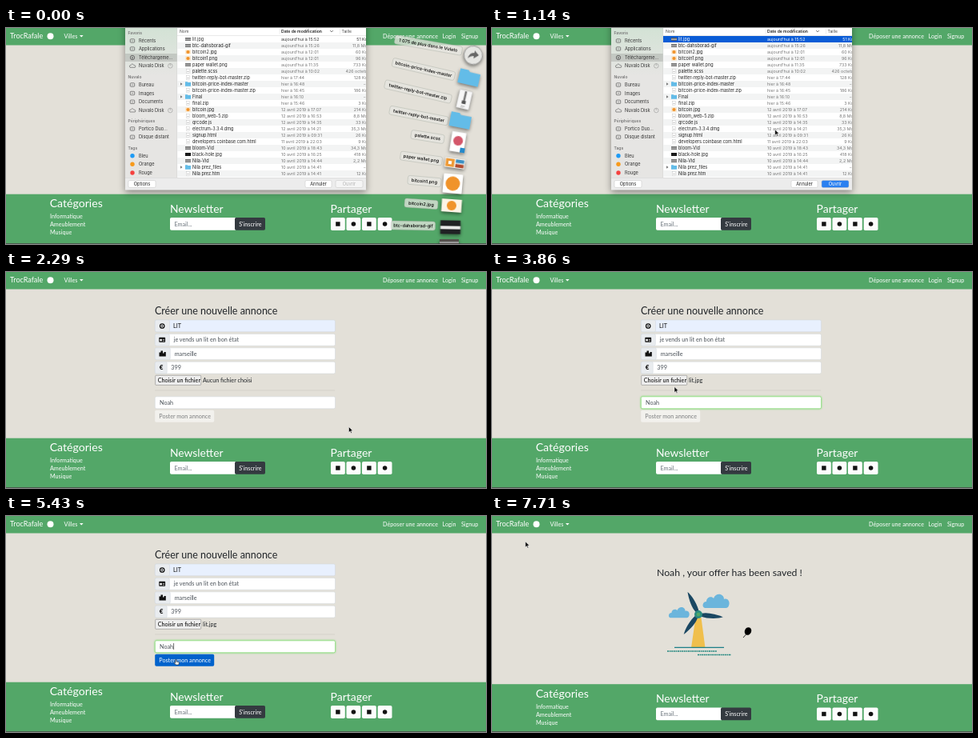
An HTML page that plays this animation: 600x270 px, repeating every 8 s.

```html
<!DOCTYPE html>
<html lang="fr">
<head>
<meta charset="utf-8">
<style>
html, body { margin: 0; width: 100%; height: 100%; overflow: hidden; background: #e3e0d8 }
svg { display: block; width: 600px; height: 270px; font-family: Lato, sans-serif }
text { white-space: pre }
.ui { font-family: Inter, sans-serif }
</style>
</head>
<body>
<svg id="stage" viewBox="0 0 600 270"></svg>
<script>
const GREEN = '#53a768', INK = '#212529';
const stage = document.getElementById('stage');

const text = (x, y, s, size = 7.2, fill = INK, more = '') =>
  `<text x="${x}" y="${y}" font-size="${size}" fill="${fill}" ${more}>${s}</text>`;
const rect = (x, y, w, h, fill, r = 0, more = '') =>
  `<rect x="${x}" y="${y}" width="${w}" height="${h}" rx="${r}" fill="${fill}" ${more}/>`;
const circle = (x, y, r, fill, more = '') =>
  `<circle cx="${x}" cy="${y}" r="${r}" fill="${fill}" ${more}/>`;
const path = (d, fill, more = '') => `<path d="${d}" fill="${fill}" ${more}/>`;
const group = (id, body, more = '') => `<g id="${id}" ${more}>${body}</g>`;
const line = (color, w = .5) => `stroke="${color}" stroke-width="${w}"`;

// Page parts
const nav = rect(0, 0, 600, 21.5, GREEN) +
  text(5, 13, 'TrocRafale', 9, '#fff') + circle(55.5, 10.3, 4, '#fff') +
  text(72.5, 12.7, 'Villes', 7.2, '#fff') + path('M92 9h4.6l-2.3 2.5z', '#fff') +
  text(471, 12.7, 'Déposer une annonce', 7.2, '#fff') +
  text(545.5, 12.7, 'Login', 7.2, '#fff') + text(569, 12.7, 'Signup', 7.2, '#fff');

const footer = rect(0, 207.7, 600, 70, GREEN) +
  text(54.7, 224, 'Catégories', 14.1, '#fff') +
  ['Informatique', 'Ameublement', 'Musique'].map((s, i) => text(55, 238.2 + i * 10, s, 7.2, '#fff')).join('') +
  text(205, 230.8, 'Newsletter', 13.8, '#fff') +
  rect(205, 237, 83, 15.8, '#fff', 1.8) + text(210.5, 247.5, 'Email...', 7.2, '#6c757d') +
  rect(286, 237, 38, 15.8, '#343a40', 1.8) + text(291.2, 247.5, "S'inscrire", 7.2, '#fff') +
  text(405.5, 230.8, 'Partager', 14, '#fff') +
  [406, 425.5, 445, 464.7].map((x, i) => rect(x, 237, 17.8, 16, '#fdfdfd', 1.8) +
    (i % 2 ? circle(x + 8.9, 245, 2.8, '#111') : rect(x + 6.2, 242.3, 5.4, 5.4, '#111'))).join('');

const fields = [
  ['LIT', 204.5, 209, '#e8f0fe'],
  ['je vends un lit en bon état', 204.3, 209.7, '#fff'],
  ['marseille', 205.3, 210.7, '#fff'],
  ['399', 201.2, 206.3, '#fff']
];
const icons = [
  circle(195.2, 67.5, 2.7, 'none', line('#111', 1.3)) + circle(195.2, 67.5, .9, '#111'),
  rect(191.3, 81.8, 7.8, 6, '#111', .8) + rect(192.3, 83.8, 2.6, 2.6, '#eee') +
    path('M195.8 84.4h2.3M195.8 86.2h2.3', 'none', line('#eee', .7)),
  path('M191.5 105.5v-5h2v-2h2.5v3h1.5v-1.5h2.3v5.5z', '#111'),
  text(191.8, 122.2, '€', 8, '#111', 'font-weight="900"')
];
const form = text(186, 53, 'Créer une nouvelle annonce', 12.5) +
  fields.map(([s, edge, x, fill], i) => {
    const y = 60 + i * 17.4;
    return rect(186.3, y, 225.2, 14.8, fill, 1.8, line('#ced4da')) +
      rect(186.3, y, edge - 186.3, 14.8, '#e9ecef', 1.8, line('#ced4da')) +
      icons[i] + text(x, y + 10, s, 7.2, i ? '#495057' : '#111');
  }).join('') +
  rect(186.7, 129.3, 57, 12, '#efefef', .8, line('#767676')) +
  text(189.7, 137.7, 'Choisir un fichier', 7.2, '#000') +
  text(246, 137.7, '', 7.2, INK, 'id="picked"') +
  rect(186, 147.7, 225, .6, '#cbc8c1') +
  rect(186.3, 155.8, 225.2, 15, '#fff', 1.8, 'id="field"') +
  text(192, 165.8, 'Noah', 7.2, '#495057', 'id="name"') + rect(0, 159, .6, 8, '#111', 0, 'id="caret"') +
  rect(186.2, 172.8, 74, 15, '#f2f1ed', 1.8, 'id="post"') +
  text(191.3, 182.8, 'Poster mon annonce', 7.2, '#7c7e7f', 'id="postText"');

const cloud = (x, y, k) => path('M2 18C-2 17-1 10 4 10 4 4 11 3 13 6 16-2 26 0 26 7 31 5 34 11 32 15 31 18 29 18 27 18Z',
  '#6bb5dc', `transform="translate(${x} ${y}) scale(${k})"`);
const blade = a => path('M-1.5 -3C-4.5 -10-3.5 -21-1 -31 2 -25 4 -12 2 -3Z', '#1a4762', `transform="translate(258 123) rotate(${a})"`);
const saved = text(206, 75, 'Noah , your offer has been saved !', 12.25) +
  cloud(264, 97, 1) + cloud(221.3, 113.3, .78) +
  path('M254.5 127h7l5 37.7h-17.5z', '#f0bf4c') +
  [-24, 98, 218].map(blade).join('') +
  circle(258, 123, 5, '#2b8c80') + circle(258, 123, 2.3, '#52a868') +
  path('M228 164.3h62', 'none', line('#1d7f88', 1.2)) +
  path('M219 169h62M257 173.5h42', 'none', line('#23877f', 1.4) + ' stroke-dasharray="2 .6"') +
  `<ellipse cx="320" cy="144" rx="4.1" ry="5" fill="#000" transform="rotate(25 320 144)"/>` +
  path('M318 147.5l-4 4.5', 'none', line('#000', .8));

// File dialog
const avril = (d, h) => `${d} avril 2019 à ${h}`;
const files = [
  ['lit.jpg', "aujourd'hui à 15:52", '51 Ko', 'bar'],
  ['btc-dahsborad-gif', "aujourd'hui à 15:26", '11,8 Mo', 'bar'],
  ['bitcoin2.jpg', "aujourd'hui à 12:01", '60 Ko', 'coin'],
  ['bitcoin1.png', "aujourd'hui à 12:01", '96 Ko', 'coin'],
  ['paper wallet.png', "aujourd'hui à 11:35", '733 Ko', 'bar'],
  ['palette.scss', "aujourd'hui à 10:02", '426 octets'],
  ['twitter-reply-bot-master.zip', 'hier à 17:44', '128 Ko'],
  ['bitcoin-price-index-master', 'hier à 16:48', '--', 'dir'],
  ['bitcoin-price-index-master.zip', 'hier à 16:45', '186 Ko'],
  ['Final', 'hier à 16:10', '--', 'dir'],
  ['final.zip', 'hier à 15:46', '3 Ko'],
  ['bitcoin.jpg', avril(12, '17:07'), '214 Ko', 'coin'],
  ['bloom_web-5.zip', avril(12, '16:53'), '8,8 Mo'],
  ['qrcode.js', avril(12, '14:35'), '33 Ko'],
  ['electrum-3.3.4.dmg', avril(12, '14:21'), '35,3 Mo'],
  ['signup.html', avril(12, '09:31'), '26 Ko'],
  ['developers.coinbase.com.html', avril(11, '22:03'), '9 Ko'],
  ['bloom-Vid', avril(10, '18:43'), '34,3 Mo', 'bar'],
  ['black-hole.jpg', avril(10, '16:25'), '418 Ko', 'dark'],
  ['Nila-Vid', avril(10, '14:44'), '2,2 Mo', 'bar'],
  ['Nila prez_files', avril(10, '14:41'), '--', 'dir'],
  ['Nila prez.htm', avril(10, '14:41'), '12 Ko']
];
const folder = (x, y, w, h) => path(`M${x} ${y}h${w * .4}l${w * .08} ${h * .13}h${w * .52}v${h * .87}h${-w}z`, '#63bce8');
const fileIcon = (kind, y) => ({
  bar: rect(224, y - 1.8, 7, 3.6, '#555') + rect(224, y - .5, 7, 1.2, '#ccc'),
  coin: rect(224.3, y - 2.7, 6.4, 5.4, '#fbe3c2') + circle(227.5, y, 2.1, '#f0932b'),
  dark: rect(224, y - 2, 7, 4, '#1a1a1a'),
  dir: folder(224, y - 2.7, 7, 5.4) + path(`M218 ${y - 1.7}v3.4l2.6-1.7z`, '#777')
})[kind] || rect(225.4, y - 2.7, 4.3, 5.4, '#fff', 0, line('#bbb', .4)) + rect(226.5, y, 2, 1, '#bbb');

const fileRow = ([name, date, size, kind], i) => {
  const y = 14 + i * 8, tone = i ? '#777' : 'inherit';
  return (i % 2 ? rect(214, y - 4, 236, 8, '#f3f4f4') : '') + fileIcon(kind, y) +
    group(i ? '' : 'first', text(233, y + 2, name, 5.5, i ? '#222' : 'inherit') +
      text(344, y + 2, date, 5.35, tone) + text(451.7, y + 2, size, 5.35, tone, 'text-anchor="end"'));
};

const places = [
  ['Récents', 16], ['Applications', 26], ['Téléchargeme…', 37], ['Nuvalo Disk', 47.3],
  ['Bureau', 71], ['Images', 81.5], ['Documents', 92.3], ['Nuvalo Disk', 103],
  ['Portico Duo…', 126], ['Disque distant', 136.3],
  ['Bleu', 159.7, '#1f9bf5'], ['Orange', 170.2, '#f79a1c'], ['Rouge', 181, '#f5413f']
];
const place = ([s, y, tag], i) =>
  (tag ? circle(158, y, 2.7, tag) :
    i == 2 ? circle(158, y, 2.7, 'none', line('#555', .8)) + path(`M158 ${y - 1.4}v2.6m-1.1-1l1.1 1 1.1-1`, 'none', line('#555', .7)) :
    s[0] == 'N' ? path(`M155 ${y + 2}q-1.5-3 1.2-3 1.5-3 3.6 0 3 .3 1.5 3z`, 'none', line('#666', .7)) +
      circle(205.3, y, 2.8, 'none', line('#888', .5)) + path(`M205.3 ${y}v-2.8`, 'none', line('#888', .5)) :
    rect(155.3, y - 2.2, 5.4, 4.4, 'none', .8, line('#666', .8)) + rect(156.8, y - .3, 2.4, .7, '#777')) +
  text(166, y + 2, s, 5.6, '#333');

const button = (x, w, s, id = '') => rect(x, 190.5, w, 9, '#fff', 1.8, line('#c4c4c4') + ` id="${id}"`) +
  text(x + w / 2, 197, s, 5.6, '#222', `text-anchor="middle" id="${id}Text"`);
const dialog = rect(149, -60, 301, 262.5, '#ececec', 0, 'style="filter:drop-shadow(0 3px 4px #0006)"') +
  rect(149, -60, 65, 247, 'url(#tint)') + rect(149, 32, 65, 10, '#000', 0, 'fill-opacity=".12"') +
  [['Favoris', 7.7], ['Nuvalo', 62.7], ['Périphériques', 118], ['Tags', 152]]
    .map(([s, y]) => text(152.5, y, s, 5, '#777', 'font-weight="600"')).join('') +
  places.map(place).join('') +
  rect(214, -60, 236, 247, '#fff') + rect(214, 9.4, 236, .5, '#d5d5d5') + rect(213.6, -60, .5, 247, '#d0d0d0') +
  text(217, 6, 'Nom', 5.1, '#444') + text(344, 6, 'Date de modification', 5.1, '#222', 'font-weight="600"') +
  path('M405 3l2 2 2-2', 'none', line('#555', .7)) + text(419.5, 6, 'Taille', 5.1, '#444') +
  path('M342 1v7M417.5 1v7', 'none', line('#ddd')) +
  rect(214, 10, 236, 8, '#0a5cd6', 0, 'id="selection"') +
  `<g clip-path="url(#list)">${files.map(fileRow).join('')}</g>` +
  rect(149, 187, 301, .5, '#cfcfcf') +
  button(153, 34, 'Options') + button(374, 33, 'Annuler') + button(412, 34, 'Ouvrir', 'open');

// Fan of recent downloads: label, label centre, tilt, icon centre
const fanItems = [
  ['1 075 de plus dans le Vuleto', 528, 21.5, 10, 584, 34, circle(0, 0, 11.5, '#e6e6e3', line('#9a9a98', 1)) +
    path('M-6 5q1-8 7-8v-3l6 5-6 5v-3q-4 0-7 4z', '#666')],
  ['bitcoin-price-index-master', 522, 51.5, 13, 579, 62, folder(-13, -9, 26, 18)],
  ['twitter-reply-bot-master.zip', 515, 79.5, 13, 573, 89, rect(-8, -11, 16, 23, '#f7f7f7', .5, line('#bbb')) +
    rect(-1.3, -10, 2.6, 13, '#777') + rect(-2.5, 2, 5, 4, '#555') + text(-3, 10.5, 'ZIP', 3.6, '#888')],
  ['twitter-reply-bot-master', 516, 109.5, 11, 568, 115.5, folder(-13, -9, 26, 18)],
  ['palette.scss', 527, 136, 9, 565, 142, rect(-9, -12, 18, 25, '#fff', .5, line('#ccc')) +
    circle(0, -1, 6, '#d4576a') + rect(4, 7, 6, 6, '#2489ca')],
  ['paper wallet.png', 519, 163, 8, 561, 169, rect(-12.5, -6, 25, 12, '#f4f4f0') + rect(-11.5, -5, 11, 10, '#ee9a36') +
    rect(1, -5, 10.5, 4.3, '#3b8fc4') + rect(1, .7, 10.5, 4.3, '#b04c30') + rect(-8, -2, 4, 4, '#fff')],
  ['bitcoin1.png', 523, 191.5, 5, 558.5, 194.5, rect(-12, -12, 24, 24, '#fff', 1) + circle(0, 0, 9, '#f0932b')],
  ['bitcoin2.jpg', 519, 219.8, 4, 557, 222, rect(-12.5, -8, 25, 16, '#fdf4e6') + circle(0, 0, 6, '#f0932b')],
  ['btc-dahsborad-gif', 509, 247, 1, 555.5, 248.5, rect(-12.5, -8, 25, 17, '#202124') + rect(-12.5, -1, 25, 4, '#e8e8e8')],
  ['', 0, 0, 0, 554, 269, rect(-12, -5, 24, 12, '#55514d') + rect(-12, -2, 24, 2, '#999')]
];
const fan = fanItems.map(([s, x, y, tilt, ix, iy, art]) => {
  const w = s.length * 2.72 + 9;
  return (s ? `<g transform="translate(${x} ${y}) rotate(${tilt})">` +
    rect(-w / 2, -5.5, w, 11, '#e6e6e0', 2.5, 'fill-opacity=".75" ' + line('#a4aaa0', .4)) +
    text(0, 2, s, 5.6, '#000', 'text-anchor="middle" font-weight="500"') + '</g>' : '') +
    `<g transform="translate(${ix} ${iy}) rotate(${tilt})" style="filter:drop-shadow(0 2px 2px #0007)">${art}</g>`;
}).join('');

stage.innerHTML = '<clipPath id="list"><rect x="214" y="-60" width="236" height="247"/></clipPath>' +
  '<linearGradient id="tint" gradientUnits="userSpaceOnUse" x1="0" y1="0" x2="0" y2="60">' +
  '<stop stop-color="#d3e2d5"/><stop offset="1" stop-color="#e6e5e3"/></linearGradient>' +
  '<linearGradient id="tintEnd"/>'.slice(0, 0) +
  rect(0, 0, 600, 270, '#e3e0d8') + nav + group('form', form) + group('saved', saved) + group('footer', footer) +
  rect(0, 269, 600, 1, '#4a5a4e') +
  group('dialog', dialog, 'class="ui"') + group('fan', fan, 'class="ui"') +
  group('cursor',
    path('M0 0V7L1.7 5.5 2.8 8 3.9 7.5 2.8 5.1H5Z', '#000', 'id="arrow" ' + line('#fff', .5)) +
    path('M0 0Q1-.8 1.5.4V3L5 3.8Q5.7 4.2 5.4 6L4.8 8H.8L-2 5Q-2 3.8-.7 4.4L0 5Z', '#eee',
      'id="hand" transform="scale(.82)" ' + line('#222', .7)));

const el = {};
stage.querySelectorAll('[id]').forEach(e => { if (e.id) el[e.id] = e; });
const set = (id, attrs) => { for (const k in attrs) el[id].setAttribute(k, attrs[k]); };
const show = (id, on) => set(id, { visibility: on ? 'visible' : 'hidden' });
const clamp = v => Math.max(0, Math.min(1, v));
const ease = v => v * v * (3 - 2 * v);

// Cursor stops: step, x, y
const stops = [
  [1, 556, 160], [5, 262, 14], [6, 262, 14], [8, 353.7, 127], [10, 428.5, 193.5], [17, 428.5, 193.5],
  [21, 300, 162], [24, 300, 162], [27, 228, 143.5], [30, 228, 143.5], [34, 211.8, 179.5],
  [45, 211.8, 179.5], [54, 41.7, 32]
];
function cursorAt(n) {
  const i = stops.findIndex(s => s[0] >= n);
  if (i < 0) return stops[stops.length - 1].slice(1);
  if (!i) return stops[0].slice(1);
  const [a, x, y] = stops[i - 1], [b, u, v] = stops[i], p = ease((n - a) / (b - a));
  return [x + (u - x) * p, y + (v - y) * p];
}

function draw(ms) {
  const n = Math.min(55, Math.floor((ms + 5) * 7 / 1000)), t = n * 1000 / 7;

  const close = clamp(n / 4);
  show('fan', n < 4);
  set('fan', { opacity: 1 - close * .6, transform: `translate(${554 * close} ${275 * close}) scale(${1 - close})` });

  const chosen = n >= 6;
  show('selection', chosen && n < 15);
  set('first', { fill: chosen ? '#fff' : '#333' });
  set('open', { fill: chosen ? '#2a80f0' : '#f5f5f5' });
  set('openText', { fill: chosen ? '#fff' : '#b5b5b5' });
  set('dialog', { transform: `translate(0 ${-215 * ease(clamp((n - 11) / 4))})` });
  show('dialog', n < 15);

  const done = n >= 41, focus = n >= 21, hover = n >= 33;
  set('form', { display: done ? 'none' : 'inline' });
  set('saved', { display: done ? 'inline' : 'none' });
  set('footer', { transform: `translate(0 ${done ? 2.5 : 0})` });
  el.picked.textContent = n < 17 ? 'Aucun fichier choisi' : 'lit.jpg';
  set('field', {
    stroke: focus ? '#93dc86' : '#ced4da', 'stroke-width': focus ? .8 : .5,
    style: focus ? 'filter:drop-shadow(0 0 1.2px #7be06c)' : ''
  });
  show('caret', focus && !done && Math.floor((t - 5200) / 530) % 2 == 0);
  set('caret', { x: 192.4 + nameWidth });
  set('post', { fill: hover ? '#0062cc' : '#f2f1ed' });
  set('postText', { fill: hover ? '#fff' : '#7c7e7f' });

  const hand = n >= 33 && n <= 45;
  show('cursor', n > 0);
  set('arrow', { display: hand ? 'none' : 'inline' });
  set('hand', { display: hand ? 'inline' : 'none' });
  set('cursor', { transform: `translate(${cursorAt(n)})` });
}

const nameWidth = el.name.getComputedTextLength();
const tick = () => { draw(performance.now() % 8000); requestAnimationFrame(tick); };
tick();
</script>
</body>
</html>
```
